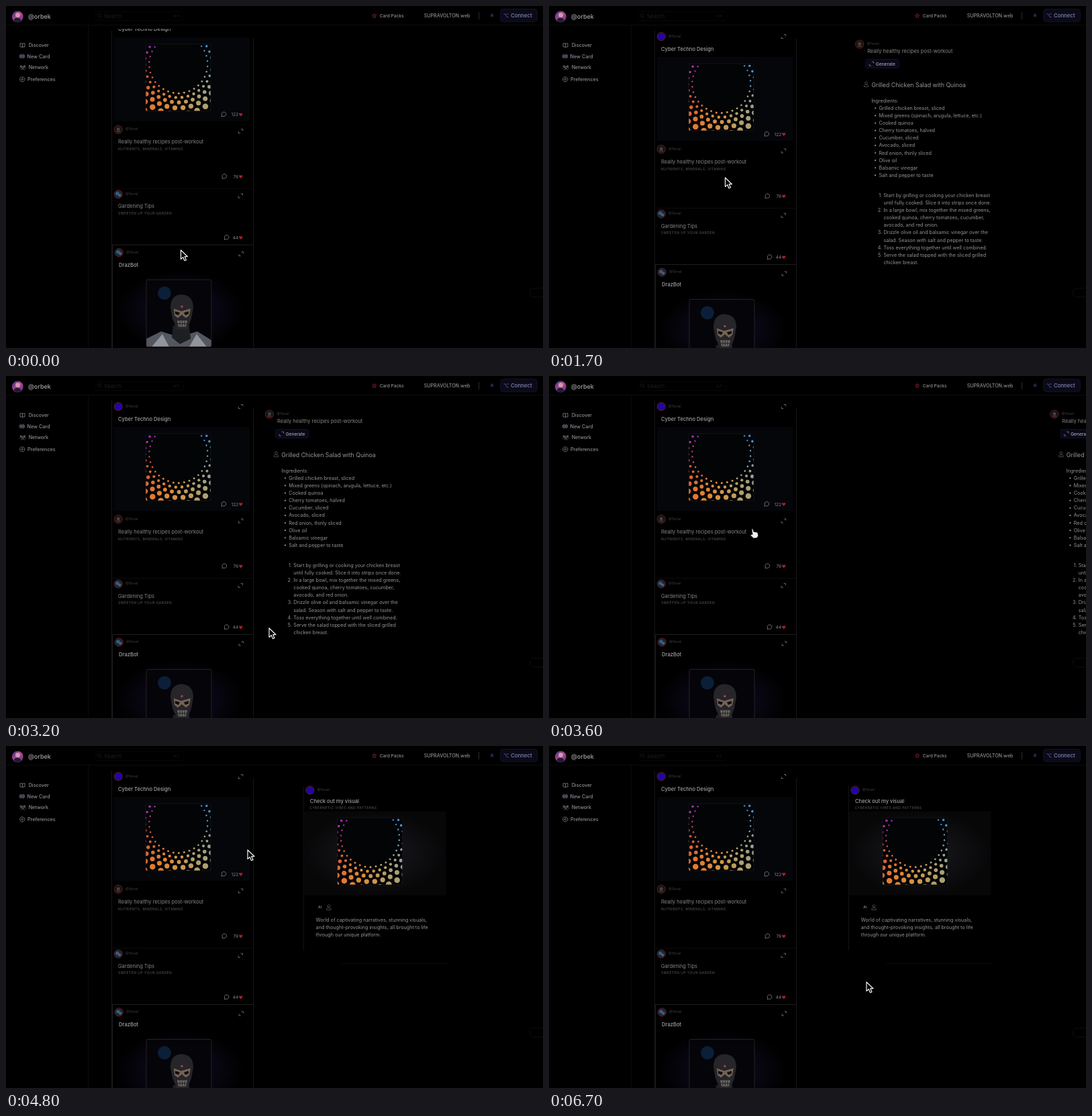
These frames come from a looping animation (800 px wide and 510 px high, 6.8 s). An HTML page:

```html
<!DOCTYPE html>
<html lang="en">
<head>
<meta charset="utf-8">
<title>Card feed</title>
<style>
  html, body { margin: 0; width: 100%; height: 100%; overflow: hidden; background: #000; }
  svg { display: block; width: 800px; height: 510px; }
  text { font-family: Inter, Roboto, sans-serif; fill: #8c8c8c; white-space: pre; }
  .nav { fill: #8e8e8e; font-weight: 500; }
  .title { fill: #a2a2a2; font-weight: 500; }
  .light { fill: #858585; }
  .cap { fill: #5c5c5c; letter-spacing: .47px; }
  .user { fill: #46464f; }
  .body { fill: #959595; }
  .ico { fill: none; stroke: #858585; stroke-width: .8; stroke-linecap: round; stroke-linejoin: round; }
  .dim { stroke: #555; }
  .line { fill: none; stroke: #171717; stroke-width: 1; }
</style>
</head>
<body>
<svg id="stage" viewBox="0 0 800 510" xmlns="http://www.w3.org/2000/svg"></svg>
<script>
const LOOP = 6800, STEP = 100;

// ---- drawing helpers ----
const text = (x, mid, size, cls, str, extra = '') =>
  `<text x="${x}" y="${(mid + size * .36).toFixed(2)}" font-size="${size}" class="${cls}" ${extra}>${str}</text>`;
const path = (d, cls = 'ico', extra = '') => `<path d="${d}" class="${cls}" ${extra}/>`;
const at = (x, y, inner) => `<g transform="translate(${x} ${y})">${inner}</g>`;
const rect = (x, y, w, h, fill, extra = '') =>
  `<rect x="${x}" y="${y}" width="${w}" height="${h}" fill="${fill}" ${extra}/>`;
const circle = (x, y, r, fill, extra = '') => `<circle cx="${x}" cy="${y}" r="${r}" fill="${fill}" ${extra}/>`;

const expand = (x, y) => at(x, y, path('M.8-3H3.2V-.8M-3.2.8V3H-.8', 'ico', 'stroke-width="1.1"'));
const person = (x, y) => at(x, y, path('M-1.9-1.6a1.9 1.9 0 1 0 3.8 0a1.9 1.9 0 1 0-3.8 0M-3.2 3.8V2.6Q-3.2 1.4-2 1.4H2Q3.2 1.4 3.2 2.6V3.8Z', 'ico dim'));
const likes = (y, n, x) => at(x, y, path('M-3.1 2.9L-2.9.9A3.3 3.3 0 1 1-1 2.8Z')) +
  text(346.3, y + .3, 6.6, 'light', n, 'text-anchor="end"') +
  at(349.8, y + .3, '<path d="M0 2.6C-4.6-.8-2-3.6 0-1.5C2-3.6 4.6-.8 0 2.6Z" fill="#a5202c"/>');

const faces = {
  blue: circle(0, 0, 5.6, '#1c08a6'),
  dark: circle(0, 0, 5.6, '#151514') + circle(0, -.6, 2.4, '#3a4a40') + rect(-3, 1.8, 6, 2.2, '#4a2c28'),
  steel: circle(0, 0, 5.6, '#17283c') + circle(-1.4, -1, 2.6, '#2d6480') + circle(2, 1.6, 2.2, '#5a5a68')
};
const avatar = (x, y, face) => at(x, y, faces[face] +
  circle(0, 0, 6.1, 'none', 'stroke="#78202a" stroke-width=".9"'));
const author = (x, y, face) => avatar(x, y, face) + text(x + 11, y - .4, 4.6, 'user', '@Torvel');

// ---- halftone picture, 97 x 100 ----
const hues = [[-60, 50, 120, 220], [-30, 62, 146, 214], [0, 108, 168, 192], [40, 160, 160, 136],
  [65, 178, 160, 104], [90, 212, 150, 70], [120, 226, 124, 48], [150, 216, 92, 50],
  [180, 190, 66, 100], [212, 160, 50, 186], [300, 110, 60, 210]];
function hue(a) {
  const i = Math.max(1, hues.findIndex(h => h[0] >= a));
  const p = hues[i - 1], q = hues[i], k = (a - p[0]) / (q[0] - p[0]);
  return `rgb(${[1, 2, 3].map(c => Math.round(p[c] + (q[c] - p[c]) * k))})`;
}
function halftone() {
  let out = '';
  for (let ring = 0; ring < 7; ring++) {
    const r = 43.5 * 1.145 ** ring, size = 1.5 + .72 * Math.min(ring, 4.4);
    for (let i = 0; i < 34; i++) {
      const deg = (i + (ring % 2) / 2) * 360 / 34 - 59, a = deg * Math.PI / 180;
      const x = 48.8 + r * Math.cos(a), y = 30 + r * Math.sin(a);
      if (x > -5 && x < 102 && y > -5 && y < 105)
        out += circle(x.toFixed(1), y.toFixed(1), (size * (.8 + .2 * Math.max(0, Math.sin(a)))).toFixed(2), hue(deg));
    }
  }
  return out;
}
const picture = (x, y) => at(x, y, rect(0, 0, 97, 100, '#030406') +
  `<use href="#dots"/>` + rect(0, 0, 97, 100, 'none', 'stroke="#16181c" stroke-width=".7" rx="1"'));

const robot = at(209, 437.5, rect(-46, -14, 192, 120, 'url(#violet)') +
  `<g clip-path="url(#frame)">` + rect(0, 0, 97, 100, '#040409') +
  circle(27, 20, 10, '#0b1f38') +
  '<path d="M0 100V88L22 77L38 82L48 94L60 82L76 77L97 90V100Z" fill="#53575f"/>' +
  '<path d="M8 100L24 81L34 100ZM64 100L75 81L90 100Z" fill="#92959c"/>' +
  '<path d="M40 68H64L66 88L50 96L38 86Z" fill="#1e1f23"/>' +
  '<path d="M36 42Q36 22 53 22Q70 23 70 42L67 58L61 74H46L39 58Z" fill="#25252a"/>' +
  '<path d="M41 43L52 47L66 43L64 53L59 57L53 52L47 57L42 53Z" fill="#726455"/>' +
  '<path d="M43 47L50 49L48 53L43 51ZM56 49L63 47L63 51L58 53Z" fill="#180b0e"/>' +
  '<path d="M46 61H61L59 70H48Z" fill="#6b665f"/><path d="M47 65.500H60M50 62V69M53.500 62V69M57 62V69" stroke="#202024" fill="none"/>' +
  circle(53, 40, 1.7, '#a8404c') + '</g>' +
  rect(0, 0, 97, 100, 'none', 'rx="2" stroke="#33262f" stroke-width=".8"'));

// ---- parts of the page ----
const defs = `<defs>
  <clipPath id="feedClip"><rect x="150" y="34" width="222" height="476"/></clipPath>
  <clipPath id="frame"><rect width="97" height="100" rx="2"/></clipPath>
  <g id="dots" clip-path="url(#frame)">${halftone()}</g>
  <radialGradient id="violet"><stop offset=".3" stop-color="#0d0a1c"/><stop offset="1" stop-color="#000"/></radialGradient>
  <radialGradient id="grey"><stop offset=".3" stop-color="#15151a"/><stop offset="1" stop-color="#070708"/></radialGradient>
  <linearGradient id="me" x2="1" y2="1"><stop stop-color="#35347c"/><stop offset=".5" stop-color="#b04a92"/><stop offset="1" stop-color="#5a2c80"/></linearGradient>
</defs>`;

const header =
  circle(17.3, 16, 8.4, 'url(#me)') +
  '<path d="M11.500 21.500Q13 17 17 17.500Q22 18 22.500 22Q17 26.500 11.500 21.500Z" fill="#201a36"/>' + circle(17.5, 13.5, 3.4, '#dc95ad') +
  text(33, 16, 9, 'title', '@orbek') +
  rect(133, 8.5, 131, 13, 'none', 'rx="3" stroke="#070707"') +
  at(139, 14.5, path('M-2.6-.6a2.4 2.4 0 1 0 4.800 0a2.400 2.400 0 1 0-4.800 0M1.800 1.500L3.200 3', 'ico', 'style="stroke:#1c1c1c"')) +
  text(146, 15, 7.9, '', 'Search', 'style="fill:#1d1d1d"') +
  text(249, 15, 5.5, '', '⌘K', 'style="fill:#141414"') +
  at(548.7, 14.6, path('M0-3L.9-1L3-.8L1.400.7L1.900 2.800L0 1.700L-1.900 2.800L-1.400.7L-3-.8L-.9-1Z', 'ico', 'style="stroke:#a3202c"')) +
  text(556.7, 14.7, 6.6, 'nav', 'Card Packs') +
  text(622.7, 14.5, 7.1, 'nav', 'SUPRAVOLTON.web') +
  path('M704.500 9V20', 'line', 'style="stroke:#2c2c2c"') +
  at(724, 14, '<path d="M-2.800 1.800Q-1.800.6-1.800-1A1.800 1.800 0 0 1 1.800-1Q1.800.6 2.800 1.800ZM-.9 2.500H.9L0 3.500Z" fill="#26264a"/>') +
  rect(736.5, 4.5, 55, 19, '#0a0a18', 'rx="4" stroke="#111126"') +
  at(745, 14.2, path('M-3.200-2.200H-1.200L1.200 2.400H3.200M1-2.200H3.200', 'ico', 'style="stroke:#6464a0"')) +
  text(752, 14.4, 7.8, '', 'Connect', 'style="fill:#8484b4;font-weight:500"') +
  path('M0 28.500H800M122.500 28V510', 'line', 'style="stroke:#0c0c0c"');

const sidebar =
  at(24.5, 58.5, path('M0-2.200V3M0-2.200Q-1.500-3.200-3.500-2.800V2.400Q-1.500 2.200 0 3Q1.500 2.200 3.500 2.400V-2.800Q1.500-3.200 0-2.200')) +
  text(33.7, 58.3, 7.2, 'nav', 'Discover') +
  at(24, 75, path('M-3.300-1.800V1.800M-1.700-3V3M0-2V2M1.700-3V3M3.300-1.800V1.800', 'ico', 'style="stroke:#9494b4"')) +
  text(31.5, 75, 7.2, 'nav', 'New Card') +
  at(25, 91.7, path('M-1.400-.4a1.400 1.400 0 1 0 2.800 0a1.400 1.400 0 1 0-2.800 0M-2.500 3.300Q0 .4 2.500 3.300M-4.300 1.200Q-3.500-.2-2.600-.3M4.300 1.200Q3.500-.2 2.600-.3M-3.800-2a1 1 0 1 0 2 0a1 1 0 1 0-2 0M1.800-2a1 1 0 1 0 2 0a1 1 0 1 0-2 0')) +
  text(33.7, 91.7, 7.2, 'nav', 'Network') +
  at(24.3, 109.3, path('M-1.200 0a1.200 1.200 0 1 0 2.400 0a1.200 1.200 0 1 0-2.400 0M-1.500-3.300H1.500L3.500-1.300V1.500L1.500 3.400H-1.500L-3.500 1.500V-1.300Z')) +
  text(32, 109.4, 7.2, 'nav', 'Preferences');

const feed =
  author(167.3, 45.5, 'blue') + expand(349.5, 45.5) +
  text(167, 64, 7.6, 'title', 'Cyber Techno Design') +
  rect(161, 76, 202.5, 125, '#04060a') + picture(208, 86) + likes(191, 122, 324.3) +
  author(167.3, 213.5, 'dark') + expand(349.5, 216) +
  text(167, 232, 7.5, 'light', 'Really healthy recipes post-workout') +
  text(167, 242.7, 5, 'cap', 'NUTRIENTS, MINERALS, VITAMINS') + likes(283.5, 76, 325.2) +
  path('M158 301.500H368', 'line', 'style="stroke:#0c0c0c"') +
  author(167.3, 310, 'steel') + expand(349.3, 312.3) +
  text(167, 328, 7.5, 'light', 'Gardening Tips') +
  text(167, 338.5, 5, 'cap', 'SWEETEN UP YOUR GARDEN') + likes(374.5, 44, 328.5) +
  path('M158.500 540V385.500H368.500', 'line', 'style="stroke:#1e1e1e"') +
  author(168.3, 397, 'steel') + expand(350.3, 399) +
  text(168, 415.3, 7.6, 'title', 'DrazBot') + robot;

const foods = ['Grilled chicken breast, sliced', 'Mixed greens (spinach, arugula, lettuce, etc.)', 'Cooked quinoa',
  'Cherry tomatoes, halved', 'Cucumber, sliced', 'Avocado, sliced', 'Red onion, thinly sliced', 'Olive oil',
  'Balsamic vinegar', 'Salt and pepper to taste'];
const steps = ['1.Start by grilling or cooking your chicken breast', 'until fully cooked. Slice it into strips once done.',
  '2.In a large bowl, mix together the mixed greens,', 'cooked quinoa, cherry tomatoes, cucumber,', 'avocado, and red onion.',
  '3.Drizzle olive oil and balsamic vinegar over the', 'salad. Season with salt and pepper to taste.',
  '4.Toss everything together until well combined.', '5.Serve the salad topped with the sliced grilled', 'chicken breast.'];
const stepLine = (s, i) => {
  const y = 282.2 + i * 11.12, [, n, line] = s.match(/^(\d\.)?(.*)$/);
  return (n ? text(426, y, 7.2, 'body', n, 'text-anchor="end"') : '') + text(428.3, y, 7.2, 'body', line);
};

const recipe =
  author(392.5, 57, 'dark') +
  text(404, 67.3, 7.5, 'light', 'Really healthy recipes post-workout') +
  rect(401.5, 79.5, 49.5, 13, '#080818', 'rx="3" stroke="#10102c"') + expand(410.3, 86.2) +
  text(416.7, 86.2, 6.6, '', 'Generate', 'style="fill:#a4a4ae;font-weight:500"') +
  person(402.5, 116.3) + text(410.3, 118, 8.8, 'body', 'Grilled Chicken Salad with Quinoa') +
  text(410.3, 141, 7.2, 'body', 'Ingredients:') +
  foods.map((f, i) => circle(416, 152.3 + i * 11.12, 1.1, '#959595') + text(421.3, 152.2 + i * 11.12, 7.2, 'body', f)).join('') +
  steps.map(stepLine).join('');

const visual =
  path('M446.500 60V305', 'line', 'style="stroke:#131313"') + path('M502 324.500H660', 'line', 'style="stroke:#0b0b0b"') +
  author(456, 66, 'blue') +
  text(456, 81.8, 7.6, 'title', 'Check out my visual') +
  text(455.5, 92.3, 5, 'cap', 'CYBERNETIC VIBES AND PATTERNS') +
  rect(447, 97.5, 211.5, 125, 'url(#grey)') + picture(496.8, 107) +
  text(468.3, 240.3, 5, 'light', 'AI', 'style="font-weight:600"') + person(484, 240.3) +
  ['World of captivating narratives, stunning visuals,', 'and thought-provoking insights, all brought to life', 'through our unique platform.']
    .map((s, i) => text(464.8, 259.3 + i * 11.2, 7.2, 'body', s)).join('');

const arrow = '<path d="M0 0V13.500L3.200 10.600L5.500 15.800L8 14.700L5.800 9.700H10Z" fill="#060606" stroke="#f2f2f2" stroke-width="1.2" stroke-linejoin="round"/>';
const hand = '<path d="M-1 1Q-.8-.6.6-.2L2.200 4.500L4 4.200L5.200 5L6.700 4.800L8.200 6.600L8.800 10.200L6.800 13.600L1.800 14L-2.800 9.800Q-3.400 8 .2 8.200Z" fill="#f4f4f4" stroke="#111" stroke-width=".8" stroke-linejoin="round"/>';

document.getElementById('stage').innerHTML = defs + header + sidebar +
  path('M157.500 37V510M368.500 48V510', 'line') +
  `<g clip-path="url(#feedClip)"><g id="feed">${feed}</g></g>` +
  rect(780.5, 421, 40, 13, 'none', 'rx="5" stroke="#0e0e0e"') +
  `<g id="recipe">${recipe}</g><g id="visual">${visual}</g>` +
  `<g id="cursor"><g id="arrow">${arrow}</g><g id="hand">${hand}</g></g>`;

// ---- motion ----
const node = Object.fromEntries(['feed', 'recipe', 'visual', 'cursor', 'arrow', 'hand'].map(id => [id, document.getElementById(id)]));
const ease = k => k * k * (3 - 2 * k);
const move = (el, x, y) => el.setAttribute('transform', `translate(${x.toFixed(2)} ${y.toFixed(2)})`);

// Damped spring from 1 to 0 with a slight overshoot.
function spring(ms) {
  if (ms <= 0) return 1;
  const t = ms / 1000;
  return Math.exp(-7 * t) * (Math.cos(6.17 * t) + 1.134 * Math.sin(6.17 * t));
}

const route = [[0, 260.5, 364], [850, 260.5, 364], [1300, 268, 232], [1450, 268, 232], [1700, 262.5, 256], [2250, 262.5, 256],
  [3000, 392, 376], [3300, 392, 376], [3600, 303, 228], [4200, 266, 66], [4400, 266, 66], [4800, 360, 155],
  [5700, 362, 160], [6200, 470, 380], [6700, 473, 352]];
function pointer(t) {
  const i = route.findIndex(p => p[0] > t);
  if (i < 0) return route[route.length - 1].slice(1);
  const [t0, x0, y0] = route[i - 1], [t1, x1, y1] = route[i], k = ease((t - t0) / (t1 - t0));
  return [x0 + (x1 - x0) * k, y0 + (y1 - y0) * k];
}

function draw(now) {
  const t = Math.floor((now % LOOP) / STEP) * STEP;
  move(node.feed, 0, -29.3 * (1 - ease(Math.min(1, Math.max(0, (t - 200) / 500)))));
  move(node.recipe, 420 * (t < 3323 ? spring(t - 1435) : 1 - spring(t - 3323)), 0);
  move(node.visual, 372 * spring(t - 4392), 0);
  move(node.cursor, ...pointer(t));
  const link = (t >= 1200 && t < 1600) || (t >= 3600 && t < 3700) || (t >= 4100 && t < 4500);
  node.arrow.style.display = link ? 'none' : '';
  node.hand.style.display = link ? '' : 'none';
}

const start = performance.now();
function tick() {
  draw(performance.now() - start);
  requestAnimationFrame(tick);
}
tick();
</script>
</body>
</html>
```
